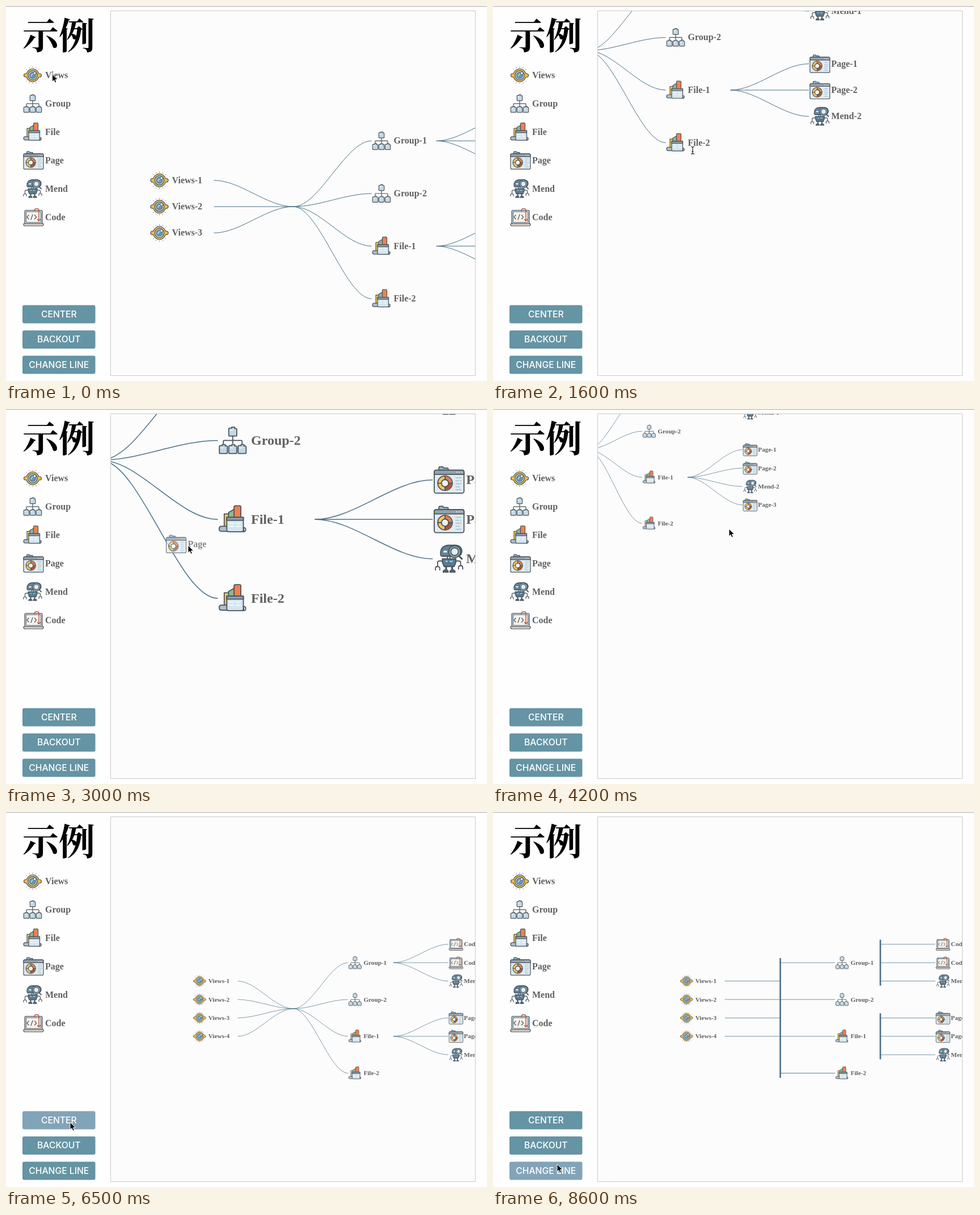
An HTML page that plays this animation: 848 px wide and 660 px high, repeating every 8700 ms.

```html
<!DOCTYPE html>
<html lang="zh">
<head>
<meta charset="utf-8">
<title>示例</title>
<style>
  html, body { margin: 0; width: 100%; height: 100%; overflow: hidden; background: #fefefe; }
  svg { display: block; user-select: none; }
  .label { font: bold 16px "Liberation Serif", "Times New Roman", serif; fill: #606060; }
  .title { font: bold 64px "Noto Serif CJK SC", "Noto Sans CJK SC", "Noto Sans CJK", serif; text-anchor: middle; }
  .button text { font: 500 15.7px Inter, Roboto, sans-serif; fill: #fff; text-anchor: middle; }
  .icon { stroke: #4a535c; stroke-width: 1.2; stroke-linejoin: round; stroke-linecap: round; fill: none; }
  .curve { fill: none; stroke: #4b7188; stroke-width: 1; }
  .rule { stroke: #7496a9; stroke-width: 1.5; }
  .bar { stroke: #4b7188; stroke-width: 3.8; }
</style>
</head>
<body>
<svg width="848" height="660" viewBox="0 0 848 660">
  <defs>
    <clipPath id="frame"><rect x="185" y="9" width="642" height="641"/></clipPath>

    <g id="Views" class="icon">
      <path fill="#f6bd42" d="M-15.5 0q0-3 3-3h1.5C-9-8.500-4-11.500 0-11.500S9-8.500 11-3h1.500q3 0 3 3t-3 3H11C9 8.500 4 11.500 0 11.500S-9 8.500-11 3h-1.500q-3 0-3-3z"/>
      <circle r="8.300" fill="#a9c9da"/>
      <circle r="5.300" fill="#6d96ae" stroke="#55788e"/>
      <path d="M-2.500 1.500Q-2-2 1-2.500" stroke="#d9e8ef"/>
      <circle cx="3.800" cy="-3.800" r="2.500" fill="#e4f0f5" stroke-width="1"/>
      <path stroke-width="1" d="M0-14.500v.6M-6-13.500l.2.5M6-13.500l-.2.5M-11-10.500l.4.4M11-10.500l-.4.4M0 14.500v-.6M-6 13.500l.2-.5M6 13.500l-.2-.5M-11 10.500l.4-.4M11 10.500l-.4-.4"/>
    </g>

    <g id="folder" class="icon">
      <path fill="#c2d9e5" d="M-4.700-4q0-1 1-1h2.500v-1.200h3.500v1.700h1.400q1 0 1 1v6.500q0 1.300-1.300 1.300h-6.800q-1.300 0-1.300-1.300z"/>
      <path d="M-2.500-2.300h2" stroke="#eef6fa"/>
    </g>
    <g id="Group" class="icon">
      <path d="M0-5.500v9M-11 4.500V.8q0-.8.800-.8h20.400q.8 0 .8.800v3.700"/>
      <use href="#folder" y="-9.500"/>
      <use href="#folder" x="-11" y="11"/>
      <use href="#folder" y="11"/>
      <use href="#folder" x="11" y="11"/>
    </g>

    <g id="File" class="icon">
      <path fill="#f8c650" d="M-10-6.500h6.500V12H-10z"/>
      <path fill="#8fb596" d="M-5-8l6-3.500 2 3V2h-8z"/>
      <path fill="#f0814f" d="M1.500-14.500q0-1.500 1.500-1.500h5q1.500 0 1.500 1.500V0h-8z"/>
      <path fill="#aebfca" d="M-6 8h-7q-3 0-3 3t3 3H13v-3H-6z"/>
      <path fill="#d3e5ee" d="M-7-2.500H12.500v15q0 2-2 2h-15q-2.500 0-2.500-2.500z"/>
      <path fill="#8ba4b3" d="M-7-2.500H12.500V1H-7z"/>
      <path stroke="#f2f8fb" stroke-width="1.500" d="M-4 4.500h5M4 4.500h5M-4 8h5M4 8h5"/>
      <path d="M12.500 9.500q2.800 0 2.800 2.500t-2.800 2.500"/>
    </g>

    <g id="Page" class="icon">
      <path fill="#8fb8cd" d="M-12-10v-4q0-1.500 1.500-1.500h3l1 1.500h4q1.500 0 1.500 1.500v3z"/>
      <rect x="-17.500" y="-11.500" width="35" height="27" rx="2.300" fill="#dfebf1"/>
      <path fill="#96a2ab" d="M-17.500-6.500v-3q0-2 2-2h31q2 0 2 2v3z"/>
      <path d="M9-9h.1M12-9h.1M15-9h.1" stroke="#f3f6f7"/>
      <circle cx="-4.800" cy="3.800" r="8.600" fill="#f8c55a"/>
      <path fill="#df7d48" stroke="none" d="M-4.800-4.300a8.100 8.100 0 0 1 0 16.200z"/>
      <path fill="#a95639" stroke="none" d="M-4.800 3.800h8a8.100 8.100 0 0 1-8 8.100z"/>
      <circle cx="-4.800" cy="3.800" r="4.200" fill="#eef4f7"/>
      <path d="M-4.800-4.500v4M-13 3.800h3.700M-.5 3.800h4M-4.800 8v4"/>
      <path stroke="#abc4d2" d="M8-2.500h6M8 1h3M13 1h1M8 4.500h6M8 8h4M8 11.500h6"/>
    </g>

    <g id="Mend" class="icon">
      <path fill="#608399" d="M-10-5.500q-.5-9.500 9-10.500H8q7 1 7 7T8-3H-8q-2 0-2-2.500z"/>
      <circle cx="6.500" cy="-8.500" r="7" fill="#8fb2c5"/>
      <circle cx="6.500" cy="-8.500" r="4.500" fill="#e1eef4"/>
      <path d="M11.500-3.500L15 0" stroke-width="2"/>
      <path fill="#fff" stroke="none" d="M-6.500-9.500h4v2h-4z"/>
      <path d="M-2-3v2.500M1-3v2.500"/>
      <path fill="#567b91" d="M-8 0H8v4L6 9H-6l-2-5z"/>
      <path stroke="#b4d3e2" d="M-4 3h2M1 3h3"/>
      <path d="M-8 2.500h-3.500q-2 0-2 2V9M-16 13v-2q0-2 2.500-2t2.500 2v2M8 2.500h3.500q2 0 2 2V8M11 12v-2q0-2 2.500-2t2.500 2v2"/>
      <path d="M-3.500 9.500V13M3.500 9.500V13" stroke-width="2"/>
      <path fill="#567b91" d="M-7 15.500q0-2.500 3-2.500t3 2.500zM1 15.500q0-2.500 3-2.500t3 2.500z"/>
    </g>

    <g id="Code" class="icon">
      <rect x="-15.500" y="-12" width="31" height="24" rx="2.300" fill="#c1d6e1"/>
      <rect x="-13" y="-9.500" width="26" height="19" rx="1" fill="#f7f1ec" stroke-width=".9"/>
      <path fill="#dfd3cb" d="M-17.500 11.500h35v1.500q0 2.500-2.500 2.500h-30q-2.500 0-2.500-2.500z"/>
      <path d="M-8.500-3.500l-3 3.500 3 3.500M-1.500-4.500l-3 9M2 -3.500l3 3.500-3 3.500"/>
      <path stroke="#b85b43" stroke-width="1.500" d="M1.500-11q0-4 4-4t4 4V6M7 4l2.500 3L12 4"/>
    </g>

    <path id="arrow" fill="#000" stroke="#fff" stroke-width="1" d="M0 0v13.200l3-2.800 2 4.700 2.400-1-2-4.600h4.200z"/>
    <path id="beam" fill="none" stroke="#222" stroke-width="1.200" d="M-3-6.500q3 0 3 2v9q0 2-3 2M3-6.500q-3 0-3 2M3 6.500q-3 0-3-2M-1.800 2h3.600"/>
  </defs>

  <path d="M0 .5h848" stroke="#a9a9a9"/>
  <text class="title" x="93" y="75">示例</text>
  <g id="palette"></g>
  <g id="buttons"></g>
  <rect x="184.500" y="8.500" width="643" height="642" fill="#fcfcfc" stroke="#c9c9c9"/>
  <g clip-path="url(#frame)"><g id="world"></g></g>
  <g id="ghost" opacity=".75"></g>
  <use id="cursor"/>
</svg>
<script>
const LOOP = 8700, STEP = 100, UNIT = 46.3;
const $ = id => document.getElementById(id);

// Column positions, measured from the junction of the root.
const ROOT = { icon: -236, text: -214, out: -140 };
const BRANCH = { in: 138, icon: 155.5, text: 177, out: 252 };
const LEAF = { in: 390.5, icon: 409.8, text: 429.8 };

// Each row: time, then values.
const CURSOR = [
  [0, 81.5, 120], [300, 81.5, 120], [900, 305, 440], [1200, 691, 529], [1300, 691, 529],
  [1600, 352, 254], [2200, 352, 254], [2500, 69.5, 274], [2700, 69.5, 274], [3000, 321, 240],
  [3300, 440, 200], [3500, 440, 200], [4100, 416, 211], [4200, 416, 211], [4700, 127, 590],
  [5700, 127, 590], [6000, 113, 546], [7000, 113, 546], [7400, 113, 620]
];
const VIEW = [
  [0, 0, 0, 1], [1300, 0, 0, 1], [1600, -340, -274.6, 1], [1700, -340, -274.6, 1],
  [2200, -340, -274.6, 1.5], [3500, -340, -274.6, 1.5], [4100, -340, -274.6, .7],
  [6300, -340, -274.6, .7], [6500, 0, 0, .7]
];
const DRAGS = [
  { kind: 'Views', row: 0, from: 300, to: 900 },
  { kind: 'Page', row: 3, from: 2700, to: 3300 }
];
const BUTTONS = [
  { name: 'CENTER', press: 6200, release: 6300 },
  { name: 'BACKOUT', press: 5300, release: 5500 },
  { name: 'CHANGE LINE', press: 7700, release: 7800 }
];
const KINDS = ['Views', 'Group', 'File', 'Page', 'Mend', 'Code'];

const during = (t, from, to) => t >= from && t < to;

function sample(track, t) {
  const next = track.findIndex(row => row[0] > t);
  if (next < 0) return track.at(-1).slice(1);
  const a = track[next - 1], b = track[next];
  const k = (t - a[0]) / (b[0] - a[0]);
  return a.slice(1).map((v, i) => v + (b[i + 1] - v) * k);
}

function item(kind, label, icon, text, y) {
  const shift = icon + (kind === 'Page' && icon < 100 ? 1.5 : 0);
  return `<use href="#${kind}" x="${shift}" y="${y}"/>` +
    `<text class="label" x="${text}" y="${y + 5}">${label}</text>`;
}

const node = (name, col, y) => item(name.split('-')[0], name, col.icon, col.text, y);

const paletteItem = row => item(KINDS[row], KINDS[row], KINDS[row] === 'Code' ? 48.5 : 47, 69, 122 + row * 49.9);

function link(x0, y0, x1, y1, straight) {
  if (straight) return `<path class="rule" d="M${x0} ${y0 === y1 ? y0 : x0 < 0 ? y0 : y1}H${x1}"/>`;
  const third = (x1 - x0) / 3;
  return `<path class="curve" d="M${x0} ${y0}C${x0 + third} ${y0} ${x1 - third} ${y1} ${x1} ${y1}"/>`;
}

function bar(x, ys) {
  return `<path class="bar" d="M${x} ${Math.min(...ys) - 11.5}V${Math.max(...ys) + 11.5}"/>`;
}

// Evenly spaced rows around a middle.
const spread = (count, mid) => Array.from({ length: count }, (_, i) => mid + (i - (count - 1) / 2) * UNIT);

function drawTree(viewCount, hasNewPage, straight) {
  const branches = [
    { name: 'Group-1', leaves: ['Code-1', 'Code-2', 'Mend-1'] },
    { name: 'Group-2', leaves: [] },
    { name: 'File-1', leaves: ['Page-1', 'Page-2', 'Mend-2', ...(hasNewPage ? ['Page-3'] : [])] },
    { name: 'File-2', leaves: [] }
  ];
  const size = b => Math.max(1, b.leaves.length) * UNIT;
  let top = -branches.reduce((sum, b) => sum + size(b), 0) / 2;
  let lines = '', nodes = '';

  const viewYs = spread(viewCount, 0), branchYs = [];
  viewYs.forEach((y, i) => {
    lines += link(ROOT.out, y, 0, 0, straight);
    nodes += node(`Views-${i + 1}`, ROOT, y);
  });
  for (const b of branches) {
    const y = top + size(b) / 2;
    top += size(b);
    branchYs.push(y);
    lines += link(0, 0, BRANCH.in, y, straight);
    nodes += node(b.name, BRANCH, y);
    const leafYs = spread(b.leaves.length, y);
    b.leaves.forEach((leaf, i) => {
      lines += link(BRANCH.out, y, LEAF.in, leafYs[i], straight);
      nodes += node(leaf, LEAF, leafYs[i]);
    });
    if (straight && leafYs.length) lines += bar(BRANCH.out, leafYs);
  }
  if (straight) lines += bar(0, [...viewYs, ...branchYs]);
  return lines + nodes;
}

function drawButtons(t, x, y) {
  return BUTTONS.map((b, i) => {
    const top = 526.5 + i * 44.5;
    const over = x > 29 && x < 158 && y > top && y < top + 32;
    const fill = during(t, b.press, b.release) ? '#527681' : over ? '#82a4b9' : '#6594a4';
    return `<g class="button"><rect x="29" y="${top}" width="128.5" height="32" rx="3" fill="${fill}"/>` +
      `<text x="93.3" y="${top + 21.3}">${b.name}</text></g>`;
  }).join('');
}

function render(t) {
  const [x, y] = sample(CURSOR, t);
  const [panX, panY, zoom] = sample(VIEW, t);
  $('world').setAttribute('transform',
    `translate(${506.5 + panX} ${330 + panY + zoom * UNIT / 2}) scale(${zoom})`);
  $('world').innerHTML = drawTree(t < 900 ? 3 : 4, during(t, 3300, 5500), t >= 7800);
  $('buttons').innerHTML = drawButtons(t, x, y);

  const drag = DRAGS.find(d => during(t, d.from + 1, d.to));
  $('ghost').innerHTML = drag ? paletteItem(drag.row) : '';
  if (drag) {
    const [x0, y0] = sample(CURSOR, drag.from);
    $('ghost').setAttribute('transform', `translate(${x - x0} ${y - y0})`);
  }
  $('cursor').setAttribute('href', during(t, 1200, 1800) ? '#beam' : '#arrow');
  $('cursor').setAttribute('transform', `translate(${x} ${y})`);
}

$('palette').innerHTML = KINDS.map((_, row) => paletteItem(row)).join('');

const start = performance.now();
let shown = -1;
function tick() {
  const t = Math.floor((performance.now() - start) % LOOP / STEP) * STEP;
  if (t !== shown) render(shown = t);
  requestAnimationFrame(tick);
}
tick();
</script>
</body>
</html>
```
